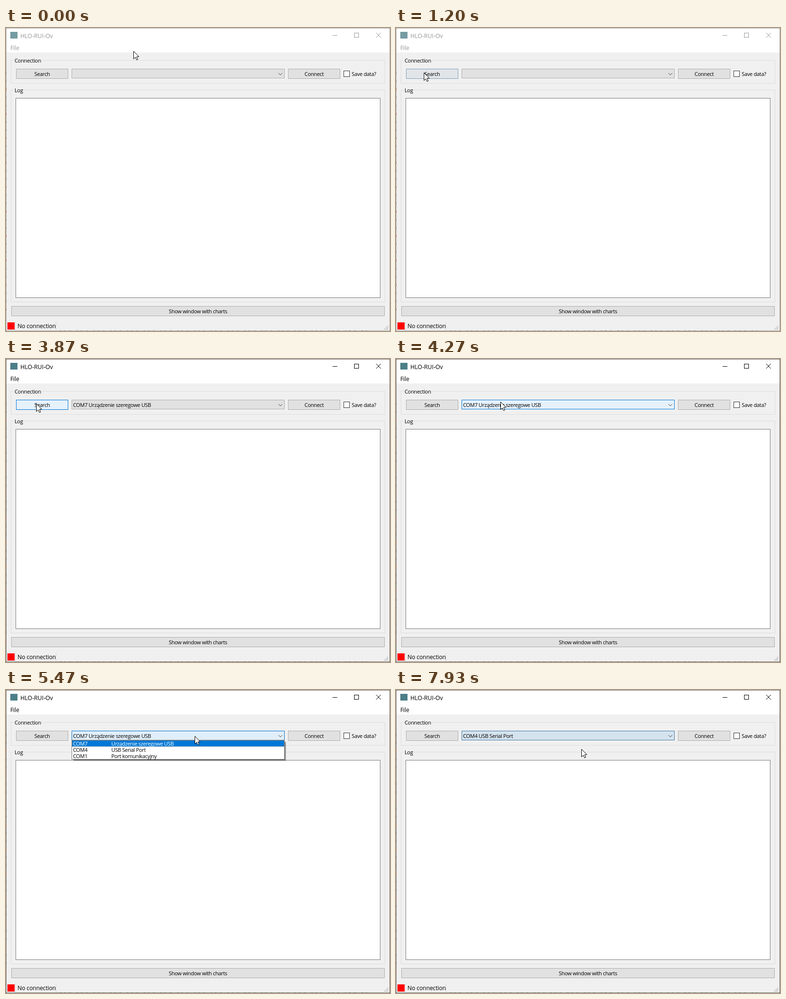
Write an HTML page with a canvas that moves like this. It is 802 by 632 pixels and loops after 8000 ms.

```html
<!DOCTYPE html>
<html lang="en">
<head>
<meta charset="utf-8">
<title>Serial connection window</title>
<style>
html, body { margin: 0; width: 100%; height: 100%; overflow: hidden; background: #f0f0f0; }
canvas { display: block; }
</style>
</head>
<body>
<canvas id="stage" width="802" height="632"></canvas>
<script>
const c = document.getElementById('stage').getContext('2d');
const LOOP = 8000, STEP = 1000 / 15;
const ACTIVE = 2000, FOUND = 2265, OPEN = 5330, CLOSE = 7670;
const PORTS = [
  ['COM7', 'Urządzenie szeregowe USB'],
  ['COM4', 'USB Serial Port'],
  ['COM1', 'Port komunikacyjny']
];
const POPUP_Y = 104, ROW = 13;

const mix = (a, b, p) => a.map((v, i) => v + (b[i] - v) * p);
const progress = (t, start, end) => Math.max(0, Math.min(1, (t - start) / (end - start)));

// Button looks: fill rgb followed by border rgb
const NORMAL = [225, 225, 225, 173, 173, 173];
const HOVER = [229, 241, 251, 0, 120, 215];
const PRESSED = [204, 228, 247, 0, 84, 153];

const fade = (t, ...fades) =>
  fades.reduce((look, [start, end, to]) => mix(look, to, progress(t, start, end)), NORMAL);
const searchLook = t => fade(t, [1130, 1400, HOVER], [ACTIVE, 2130, PRESSED], [2200, 2330, HOVER], [4000, 4230, NORMAL]);
const comboLook = t => fade(t, [4070, 4270, HOVER], [OPEN, 6000, PRESSED], [CLOSE, 8340, NORMAL]);

const REST = [215, 129], ON_SEARCH = [57, 93], ON_COMBO = [394, 96], ON_ROW = [388, 118];
const linear = p => p;
const MOVES = [
  { start: 0, end: 870, ease: linear, path: [[266, 48], [969, 150], [969, 1000], REST] },
  { start: 870, end: 1400, ease: p => 1 - (1 - p) ** 5, path: [REST, ON_SEARCH] },
  { start: 3800, end: 4530, ease: p => p ** 1.65, path: [ON_SEARCH, [225, 84], ON_COMBO] },
  { start: 6130, end: 6400, ease: linear, path: [ON_COMBO, ON_ROW] },
  { start: 6530, end: 6600, ease: linear, path: [ON_ROW, [387, 123]] }
];

function bezier(points, p) {
  if (points.length < 2) return points[0];
  return bezier(points.slice(1).map((b, i) => mix(points[i], b, p)), p);
}

function pointerAt(t) {
  const { start, end, ease, path } = MOVES.findLast(m => m.start <= t);
  return bezier(path, ease(progress(t, start, end))).map(Math.round);
}

function fill(x, y, w, h, color) {
  c.fillStyle = color;
  c.fillRect(x, y, w, h);
}

function frame(x, y, w, h, color) {
  c.strokeStyle = color;
  c.strokeRect(x + .5, y + .5, w - 1, h - 1);
}

function lines(color, ...paths) {
  c.strokeStyle = color;
  c.beginPath();
  for (const path of paths) path.forEach(([x, y], i) => i ? c.lineTo(x, y) : c.moveTo(x, y));
  c.stroke();
}

function text(s, x, y, color = '#000', size = 11, align = 'left') {
  c.font = `${size}px "Open Sans", "Noto Sans", sans-serif`;
  c.letterSpacing = size > 11 ? '-0.1px' : '-0.35px';
  c.textAlign = align;
  c.fillStyle = color;
  c.fillText(s, x, y);
}

function box(x, y, w, h, look) {
  fill(x, y, w, h, `rgb(${look.slice(0, 3)})`);
  frame(x, y, w, h, `rgb(${look.slice(3)})`);
}

function button(s, x, y, w, look = NORMAL) {
  box(x, y, w, 21, look);
  text(s, x + w / 2, y + 15, '#000', 11, 'center');
}

function group(s, y, h, w) {
  frame(10, y, 782, h, '#dcdcdc');
  fill(16, y, w, 1, '#f0f0f0');
  text(s, 18, y + 5);
}

function titleBar(active) {
  const ink = active ? '#000' : '#999';
  fill(0, 0, 802, 51, '#fff');
  fill(9, 8, 15, 14, active ? '#4c7f88' : '#759ca2');
  text('HLO-RUI-Ov', 30, 21, ink, 12.4);
  text('File', 9, 46, ink, 12);
  lines(ink, [[682, 15.5], [692, 15.5]], [[773, 10], [783, 20]], [[783, 10], [773, 20]]);
  frame(727, 10, 10, 10, ink);
}

// Window outline with specks of what lies behind it
function edges(active) {
  frame(0, 0, 802, 632, active ? '#6b6b6b' : '#aaa');
  const dark = active ? '#444' : '#777';
  for (let y = 92; y < 600; y += 17) fill(0, y, 1, 4, y % 3 ? dark : '#a0552b');
  for (let x = 112; x < 760; x += 9 + x % 7) fill(x, 631, 4, 1, dark);
}

function popup(t) {
  const selected = Math.floor((pointerAt(t)[1] - POPUP_Y - 1) / ROW);
  c.save();
  c.beginPath();
  c.rect(137, POPUP_Y, 448, 44 * progress(t, OPEN - STEP, OPEN + 2 * STEP));
  c.clip();
  for (let i = 1; i <= 3; i++) fill(141, POPUP_Y + 4, 441 + i, 37 + i, '#0003');
  fill(137, POPUP_Y, 445, 41, '#fff');
  frame(137, POPUP_Y, 445, 41, '#7a7a7a');
  PORTS.forEach(([port, label], i) => {
    const y = POPUP_Y + 1 + i * ROW, on = i === Math.max(0, selected);
    if (on) {
      fill(138, y, 443, ROW, '#0078d7');
      c.setLineDash([1, 1]);
      frame(138, y, 443, ROW, '#ff872880');
      c.setLineDash([]);
    }
    text(port, 140, y + 11, on ? '#fff' : '#000');
    text(label, 220, y + 11, on ? '#fff' : '#000');
  });
  c.restore();
}

const ARROW = new Path2D('M0 0V16L3.7 12.5L6.3 18L8.8 17L6.4 11.4H11.3Z');

function pointer(x, y) {
  c.save();
  c.translate(x + .5, y + .5);
  c.fillStyle = '#fff';
  c.fill(ARROW);
  c.strokeStyle = '#000';
  c.stroke(ARROW);
  c.restore();
}

function statusBar() {
  fill(3, 614, 15, 15, '#f00');
  text('No connection', 24, 626, '#000', 12);
  for (const x of [19, 104]) fill(x, 613, 1, 18, '#d4d4d4');
  for (let i = 0; i < 3; i++) {
    for (let j = 0; j <= i; j++) fill(796 - j * 3, 621 + i * 3, 2, 2, '#bbb');
  }
}

function draw(t) {
  const active = t >= ACTIVE;
  fill(0, 0, 802, 632, '#f0f0f0');
  titleBar(active);

  group('Connection', 67, 49, 58);
  button('Search', 21, 85, 109, searchLook(t));
  box(137, 85, 445, 20, comboLook(t));
  if (t >= FOUND) text(PORTS[t >= CLOSE ? 1 : 0].join(' '), 140, 100);
  lines('#444', [[569, 94], [573, 98], [577, 94]]);
  button('Connect', 589, 85, 109);
  fill(705, 89, 13, 13, '#fff');
  frame(705, 89, 13, 13, '#333');
  text('Save data?', 722, 100);

  group('Log', 129, 443, 21);
  fill(20, 146, 762, 417, '#fff');
  frame(20, 146, 762, 417, '#7a7a7a');
  button('Show window with charts', 11, 580, 780);

  statusBar();
  edges(active);
  if (t >= OPEN && t < CLOSE) popup(t);
  pointer(...pointerAt(t));
}

function tick() {
  const t = performance.now() % LOOP;
  // The picture advances in steps of a fifteenth of a second
  draw(Math.floor((t + 5) / STEP) * STEP);
  requestAnimationFrame(tick);
}
tick();
</script>
</body>
</html>
```
